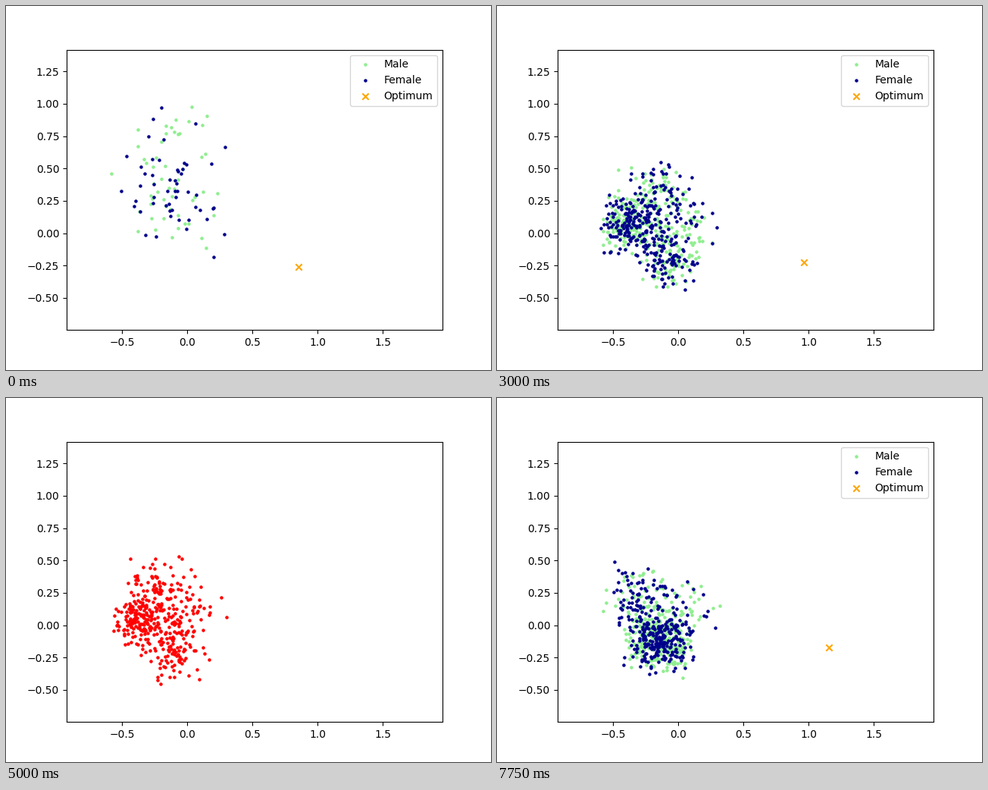
Recreate the animation shown at these times as a matplotlib script. Size 640 by 480 pixels, loop 8000 ms.

```python
import numpy as np
import matplotlib.pyplot as plt
from matplotlib.animation import FuncAnimation

FRAMES, STEP_MS = 32, 250
RED_FRAME = 20
FOUNDERS, CROWD, GROWTH = 53, 335, 1.5

# Four clusters: where each settles first, where it drifts to, spread, share
START = np.array([(-.38, .08), (-.17, .31), (-.1, -.2), (.03, .05)])
END = np.array([(-.18, -.09), (-.3, .21), (-.12, -.17), (.0, .06)])
SPREAD = np.array([.105, .125, .115, .14])
SHARE = [.45, .19, .22, .14]


def founders(rng):
    x = rng.normal(-.14, .19, FOUNDERS)
    y = rng.triangular(-.2, .2, 1.05, FOUNDERS)
    return np.column_stack([x, y])


def crowd(frame, count, rng):
    """Sample the clusters, which drift ever faster and first drop from above."""
    drift = max(0, (frame - 8) / (FRAMES - 9)) ** 2
    centers = START + (END - START) * drift
    centers[:, 1] += .2 * np.exp(-frame / 1.5)
    pick = rng.choice(len(SHARE), count, p=SHARE)
    z = rng.standard_normal((count, 2))
    z = np.where(abs(z) > 2.3, z / 2, z)
    return centers[pick] + z * SPREAD[pick, None]


def population(frame, sex):
    rng = np.random.default_rng(100 * sex + frame)
    if frame == 0:
        return founders(rng)
    return crowd(frame, int(min(CROWD, FOUNDERS * GROWTH ** frame)), rng)


def optimum(frame):
    return .854 + .0084 * frame + 4.4e-5 * frame ** 2, -.262 + .00297 * frame


fig, ax = plt.subplots(figsize=(6.4, 4.8), dpi=100)
ax.set_xlim(-0.926, 1.958)
ax.set_ylim(-0.7478, 1.4182)
male = ax.scatter([], [], s=5, color="lightgreen", label="Male")
female = ax.scatter([], [], s=5, color="darkblue", label="Female")
best = ax.scatter([], [], color="orange", marker="x", label="Optimum")
parents = ax.scatter([], [], s=5, color="red")
legend = ax.legend(loc="upper right")


def draw(frame):
    red = frame == RED_FRAME
    for artist in (male, female, best, legend):
        artist.set_visible(not red)
    parents.set_visible(red)
    if red:
        parents.set_offsets(crowd(frame, 400, np.random.default_rng(7)))
    else:
        male.set_offsets(population(frame, 0))
        female.set_offsets(population(frame, 1))
        best.set_offsets([optimum(frame)])
    return male, female, best, parents, legend


anim = FuncAnimation(fig, draw, frames=FRAMES, interval=STEP_MS, repeat=True)
plt.show()
```
